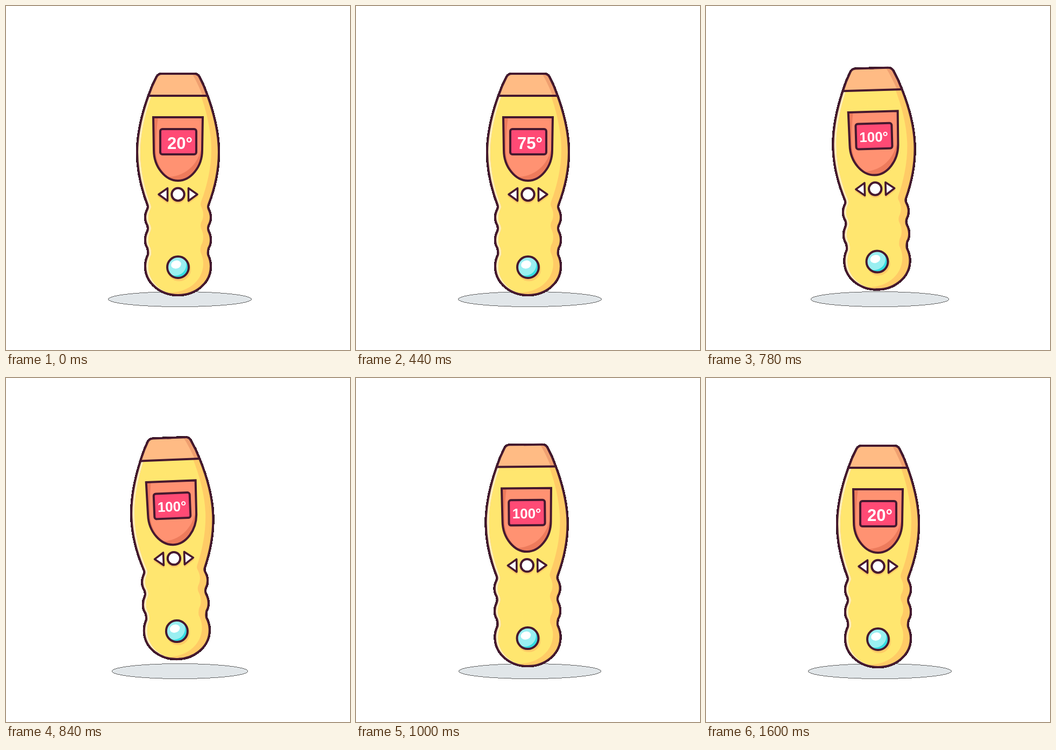
An HTML page that plays this animation: 640 px wide and 640 px high, repeating every 1.82 s.

```html
<!DOCTYPE html>
<html lang="en">
<head>
<meta charset="utf-8">
<title>Thermometer</title>
<style>
  html, body { margin: 0; width: 100%; height: 100%; overflow: hidden; background: #fff; }
  svg { display: block; width: 100%; height: 100%; }
  .line { fill: none; stroke: #46192f; stroke-width: 4; stroke-linejoin: round; }
  .edge { fill: none; stroke: #000; stroke-width: 4.6; shape-rendering: crispEdges; }
  .cast { fill: #ffcb66; stroke: #ffcb66; stroke-width: 4; stroke-linejoin: round; }
  text { font: bold 31px "Liberation Sans", Arial, sans-serif; fill: #fff; text-anchor: end; }
</style>
</head>
<body>
<svg viewBox="0 0 640 640">
  <defs>
    <path id="half" d="M316 126H350Q357 126 360 132Q369 149 375 167C388 203 396 240 396 272C396 306 388 340 377 369Q375 374 377 378Q381 386 381 393Q381 401 377 408Q375 414 377 419Q381 427 381 435Q381 444 377 450Q375 457 376 463Q381 474 381 484C381 516 352 538 320 538H316"/>
    <g id="body">
      <use href="#half"/>
      <use href="#half" transform="matrix(-1 0 0 1 640 0)"/>
    </g>
    <clipPath id="inBody">
      <use href="#half"/>
      <use href="#half" transform="matrix(-1 0 0 1 640 0)"/>
    </clipPath>
    <path id="panel" d="M274 207H366L365 268C365 300 343 325 320 325C297 325 275 300 275 268Z"/>
    <clipPath id="inPanel"><use href="#panel"/></clipPath>
    <g id="keys">
      <circle cx="320" cy="350.5" r="11.7"/>
      <path d="M284 350.5L300.5 339V362.5ZM356 350.5L339.5 339V362.5Z" stroke-width="3.6"/>
    </g>
    <circle id="button" cx="320" cy="486" r="20"/>
    <clipPath id="inButton"><use href="#button"/></clipPath>
  </defs>

  <ellipse id="shadow" rx="133" ry="14" fill="#e1e6e9" stroke="#000" stroke-width=".6" shape-rendering="crispEdges" vector-effect="non-scaling-stroke"/>

  <g id="device">
    <use href="#body" class="edge"/>
    <g clip-path="url(#inBody)">
      <rect width="640" height="640" fill="#ffedbb"/>
      <g transform="translate(6)">
        <g clip-path="url(#inBody)">
          <rect width="640" height="640" fill="#ffcb66"/>
          <use href="#body" x="-20" y="-5" fill="#ffe66f"/>
        </g>
      </g>
      <rect x="240" y="120" width="160" height="47" fill="#ffbb84"/>
      <path d="M346 126Q354 138 366 167H400V126Z" fill="#f0a070"/>
      <path class="line" d="M264 167H376"/>
    </g>
    <use href="#body" class="line"/>

    <g clip-path="url(#inPanel)">
      <rect x="270" y="200" width="100" height="130" fill="#ed7b5c"/>
      <path d="M283 207H366V248C363 290 338 316 303 318C288 308 279 290 279 268Q279 235 283 207Z" fill="#ff9272"/>
    </g>
    <use href="#panel" class="line" style="stroke-linejoin:miter"/>
    <rect class="line" x="287" y="229" width="67" height="47" rx="4" style="fill:#ff4a75"/>
    <text id="reading" x="347"></text>

    <use href="#keys" class="cast" y="3"/>
    <use href="#keys" class="line" style="fill:#fff"/>

    <use href="#button" class="cast" x="2" y="4"/>
    <g clip-path="url(#inButton)">
      <rect x="298" y="464" width="44" height="44" fill="#35dce1"/>
      <circle cx="315" cy="481" r="20.5" fill="#9aeff1"/>
      <ellipse cx="316.5" cy="481" rx="9.5" ry="7.5" fill="#fff" transform="rotate(-15 316.5 481)"/>
    </g>
    <use href="#button" class="line"/>
  </g>
</svg>
<script>
const LOOP = 1820;
const GROUND = 539;
const readings = [[0, 20], [160, 25], [300, 50], [440, 75], [600, 100], [1600, 20]];
const [shadow, device, reading] = ["shadow", "device", "reading"].map(id => document.getElementById(id));

const progress = (t, from, to) => Math.min(1, Math.max(0, (t - from) / (to - from)));
const ease = p => (1 - Math.cos(Math.PI * p)) / 2;
const pulse = (t, from, to) => Math.sin(Math.PI * progress(t, from, to)) ** 2;
const swing = (t, from, peak, to) => ease(progress(t, from, peak)) - ease(progress(t, peak, to));

function draw(t) {
  const value = readings.findLast(([start]) => t >= start)[1];
  const wide = value === 100;
  reading.textContent = value + "°";
  reading.style.fontSize = wide ? "26px" : "31px";
  reading.setAttribute("y", wide ? 263 : 266);

  const hop = swing(t, 680, 840, 1050);
  const tilt = -2.3 * swing(t, 680, 840, 1075);
  const squash = 0.02 * pulse(t, 600, 735) + 0.005 * pulse(t, 1050, 1130);
  device.setAttribute("transform",
    `translate(320 ${GROUND - 15 * hop}) rotate(${tilt}) scale(${1 + squash} ${1 - squash}) translate(-320 ${-GROUND})`);
  shadow.setAttribute("transform", `translate(323.5 545.5) scale(${1 - 0.05 * hop} 1)`);
}

function tick() {
  draw(performance.now() % LOOP);
  requestAnimationFrame(tick);
}
tick();
</script>
</body>
</html>
```
